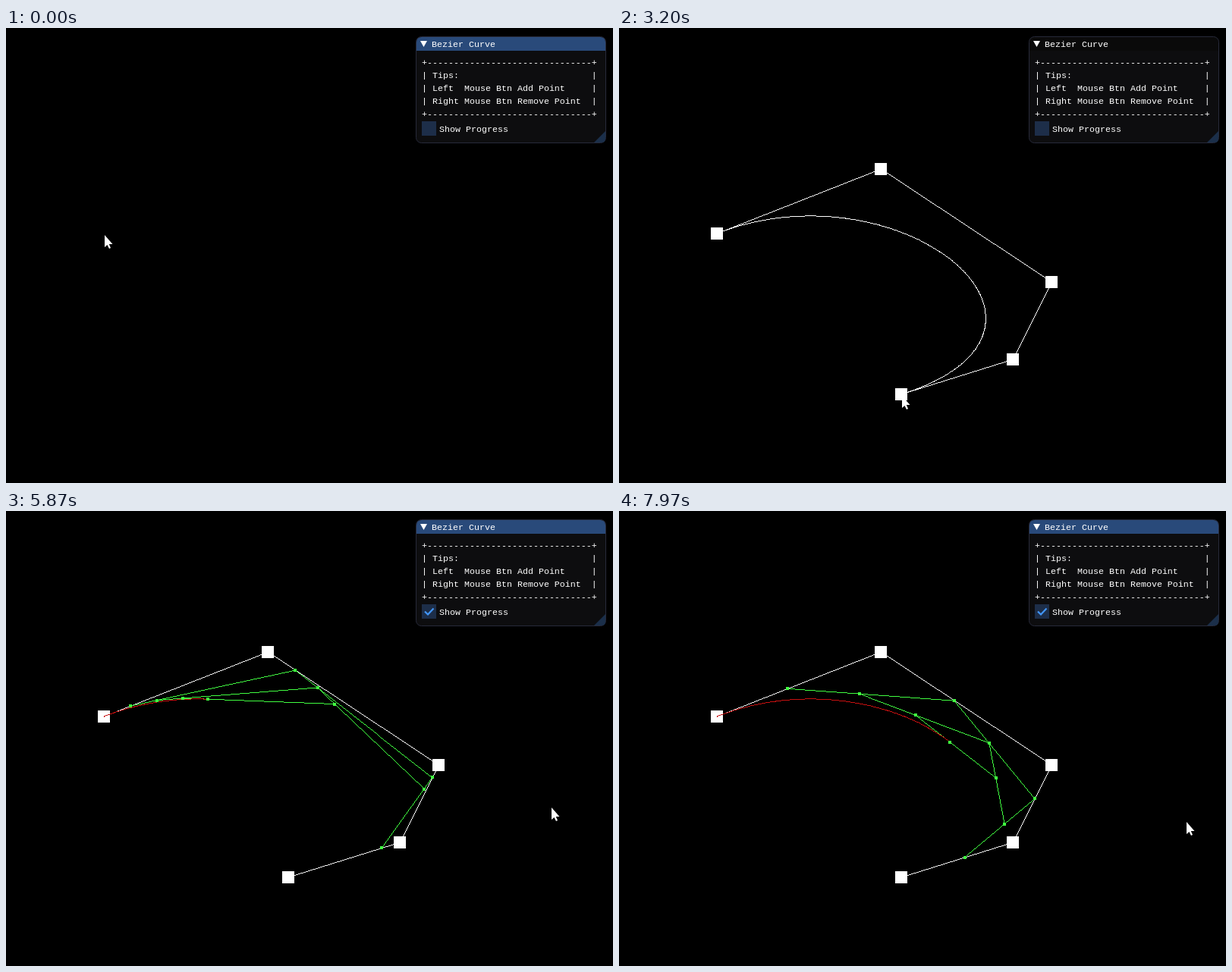
Write an HTML page with a canvas that moves like this. It is 800 px wide and 600 px high and loops after 8000 ms.

```html
<!DOCTYPE html>
<html lang="en">
<head>
<meta charset="utf-8">
<title>Bezier Curve</title>
<style>
  html, body { margin: 0; width: 100%; height: 100%; overflow: hidden; background: #000; }
  canvas, svg { position: absolute; left: 0; top: 0; }
  text { font: 11.666px "Liberation Mono", monospace; fill: #fff; white-space: pre; }
</style>
</head>
<body>
<canvas id="stage" width="800" height="600"></canvas>
<svg width="800" height="600">
  <rect x="540.5" y="11.5" width="250" height="140" rx="7" fill="#0d0d0f"/>
  <path id="title" d="M541 30V18Q541 12 547 12H784Q790 12 790 18V30Z"/>
  <rect x="540.5" y="11.5" width="250" height="140" rx="7" fill="none" stroke="#272a3a"/>
  <path d="M790 136V146Q790 151 785 151H775Z" fill="#1b2f4a"/>
  <path d="M546 17H555L550.5 25Z" fill="#fff"/>
  <text x="561" y="25">Bezier Curve</text>
  <g id="tips"></g>
  <rect id="box" x="548" y="123" width="19" height="19"/>
  <path id="check" d="M552 132.5L556 136.5L563.5 128.5" fill="none" stroke="#4296fa" stroke-width="2.2"/>
  <text x="571" y="137">Show Progress</text>
  <path id="cursor" d="M0 0V16L3.5 13L6 18L8 17L5.8 12H10.5Z" fill="#fff"/>
</svg>
<script>
const LOOP = 8000, PRESS = 4400, RELEASE = 4600, REMOVE = 5370;
const WHITE = '#fff', GREEN = '#40ff40', RED = '#c81010';

// control points: x, y, time added, time removed
const points = [
  [129, 271, 30], [345, 186, 770], [570, 335, 1370],
  [519, 437, 2330], [372, 483, 2670], [560, 133, PRESS, REMOVE]
];

// cursor moves: start, end, x, y; it rests in between
const click = (i, leave) => [leave, points[i][2] - 30, points[i][0] + 1, points[i][1] + 2];
const moves = [
  click(0, 0), click(1, 60), click(2, 900),
  [1520, 1630, 565, 371], click(3, 1630), click(4, 2360),
  [3200, 3900, 592, 165], [3900, 4240, 561, 134],
  [RELEASE, 5130, 646, 218], [5130, 5870, 719, 391], [5870, 6220, 748, 410]
];

const $ = id => document.getElementById(id);
const g = $('stage').getContext('2d');
const mix = (a, b, u) => a + (b - a) * u;

const dashes = '+' + '-'.repeat(31) + '+';
const row = s => '| ' + s.padEnd(30) + '|';
[dashes, row('Tips:'), row('Left  Mouse Btn Add Point'),
 row('Right Mouse Btn Remove Point'), dashes].forEach((s, i) => {
  const t = document.createElementNS('http://www.w3.org/2000/svg', 'text');
  t.setAttribute('x', 548);
  t.setAttribute('y', 49 + 17 * i);
  t.textContent = s;
  $('tips').append(t);
});

function cursorAt(t) {
  let [, , x, y] = moves[0];
  for (const [from, to, x1, y1] of moves.slice(1)) {
    const u = Math.min(1, Math.max(0, (t - from) / (to - from)));
    x = mix(x, x1, u);
    y = mix(y, y1, u);
  }
  return [Math.round(x), Math.round(y)];
}

// the sweep slows a little as it goes on
function progressAt(t) {
  const s = Math.max(0, t - RELEASE - 90);
  return s * (1.4e-4 - 2.6e-9 * s);
}

// hard-edged line, one pixel wide
function line([x0, y0], [x1, y1]) {
  const n = Math.max(1, Math.ceil(Math.max(Math.abs(x1 - x0), Math.abs(y1 - y0))));
  for (let i = 0; i <= n; i++)
    g.fillRect(Math.floor(mix(x0, x1, i / n)), Math.floor(mix(y0, y1, i / n)), 1, 1);
}

function polyline(list, color) {
  g.fillStyle = color;
  for (let i = 1; i < list.length; i++) line(list[i - 1], list[i]);
}

function squares(list, size, color) {
  g.fillStyle = color;
  for (const [x, y] of list)
    g.fillRect(Math.round(x) - size / 2, Math.round(y) - size / 2, size, size);
}

const reduce = (list, u) => list.slice(1).map((p, i) =>
  [mix(list[i][0], p[0], u), mix(list[i][1], p[1], u)]);

function bezier(list, u) {
  while (list.length > 1) list = reduce(list, u);
  return list[0];
}

function curve(list, end, color) {
  const n = Math.max(2, Math.ceil(end * 150));
  polyline(Array.from({ length: n + 1 }, (_, i) => bezier(list, end * i / n)), color);
}

function draw(t) {
  const active = points.filter(p => t >= p[2] && t < (p[3] || LOOP));
  const checked = t >= RELEASE;

  g.clearRect(0, 0, 800, 600);
  polyline(active, WHITE);
  if (!checked && active.length > 2) curve(active, 1, WHITE);
  squares(active, 16, WHITE);
  if (checked) {
    const u = progressAt(t), levels = [];
    for (let l = reduce(active, u); l.length; l = reduce(l, u)) levels.push(l);
    levels.forEach(l => polyline(l, GREEN));
    curve(active, u, RED);
    levels.forEach(l => squares(l, 4, GREEN));
  }

  const [x, y] = cursorAt(t);
  const hover = x >= 548 && x < 662 && y >= 123 && y < 142;
  const pressed = t >= PRESS && !checked;
  $('cursor').setAttribute('transform', `translate(${x} ${y})`);
  $('title').setAttribute('fill', t < 30 || t >= PRESS ? '#294a7a' : '#0a0a0a');
  $('box').setAttribute('fill', pressed ? '#316aad' : hover ? '#234470' : '#1d2e49');
  $('check').setAttribute('visibility', checked ? 'visible' : 'hidden');
}

const start = performance.now();
function frame() {
  draw((performance.now() - start) % LOOP);
  requestAnimationFrame(frame);
}
frame();
</script>
</body>
</html>
```
